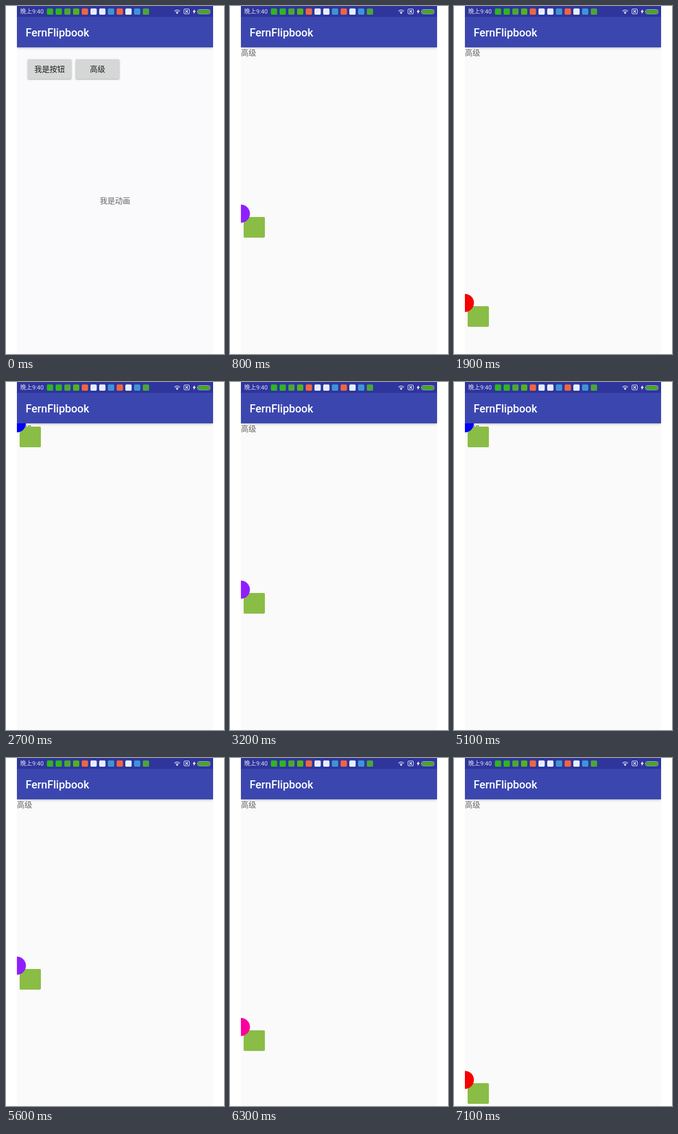
An HTML page with a canvas for the animation above (7.2 s loop, 400 by 640 pixels).

```html
<!DOCTYPE html>
<html lang="zh">
<head>
<meta charset="utf-8">
<title>FernFlipbook</title>
<style>
html, body { margin: 0; width: 100%; height: 100%; overflow: hidden; background: #fff; }
canvas { display: block; width: 400px; height: 640px; }
</style>
</head>
<body>
<canvas id="stage" width="400" height="640"></canvas>
<script>
const ctx = document.getElementById('stage').getContext('2d');
const FONT = 'Roboto, "Noto Sans CJK SC", "Noto Sans CJK", sans-serif';
const CYCLE = 2400, STEP = 100, OPEN = 300;
const DROP = { start: 315, length: 2000, top: 76, bottom: 592 };

function rect(x, y, w, h, color, r = 0) {
  ctx.fillStyle = color;
  ctx.beginPath();
  ctx.roundRect(x, y, w, h, r);
  ctx.fill();
}

function text(str, x, y, size, color, align = 'left', weight = 400) {
  ctx.font = `${weight} ${size}px ${FONT}`;
  ctx.textAlign = align;
  ctx.fillStyle = color;
  ctx.fillText(str, x, y);
}

function shadow(color, blur, dy) {
  ctx.shadowColor = color;
  ctx.shadowBlur = blur;
  ctx.shadowOffsetY = dy;
}

function line(points, width, color) {
  ctx.strokeStyle = color;
  ctx.lineWidth = width;
  ctx.beginPath();
  points.forEach(([x, y]) => ctx.lineTo(x, y));
  ctx.stroke();
}

function bounce(t) {
  t *= 1.1226;
  if (t < 0.3535) return 8 * t * t;
  if (t < 0.7408) return 8 * (t - 0.54719) ** 2 + 0.7;
  if (t < 0.9644) return 8 * (t - 0.8526) ** 2 + 0.9;
  return 8 * (t - 1.0435) ** 2 + 0.95;
}

const TINTS = [
  [0, [0, 0, 255]],
  [0.242, [143, 31, 255]],
  [0.48, [255, 0, 255]],
  [0.78, [248, 0, 0]],
  [1, [248, 0, 0]]
];

function tint(t) {
  const i = Math.max(1, TINTS.findIndex(([at]) => at >= t));
  const [a, from] = TINTS[i - 1], [b, to] = TINTS[i];
  const k = (t - a) / (b - a);
  return `rgb(${from.map((v, n) => Math.round(v + (to[n] - v) * k))})`;
}

function statusBar() {
  rect(20, 0, 360, 20, '#2e359b');
  text('晚上9:40', 26, 14, 11, '#dcdef2');
  const green = '#2fb51f', leaf = '#4ba63a', orange = '#f0653f', pale = '#e4effc', blue = '#3f94d6';
  [green, green, leaf, '#4fb31f', orange, pale, pale, blue, orange, pale, blue, leaf]
    .forEach((c, i) => rect(75 + i * 16, 4.5, 11.5, 11.5, c, 2));

  // wifi
  ctx.strokeStyle = '#e6e8f7';
  ctx.lineWidth = 1.3;
  for (const r of [3.6, 6.6]) {
    ctx.beginPath();
    ctx.arc(314, 14, r, -Math.PI * 0.77, -Math.PI * 0.23);
    ctx.stroke();
  }
  ctx.fillStyle = '#fff';
  ctx.beginPath();
  ctx.arc(314, 13, 1.4, 0, 7);
  ctx.fill();

  // no signal
  ctx.lineWidth = 1;
  ctx.beginPath();
  ctx.roundRect(326.5, 5.5, 10, 9, 1.5);
  ctx.stroke();
  line([[329, 7.5], [334, 12.5]], 1.2, '#e6e8f7');
  line([[334, 7.5], [329, 12.5]], 1.2, '#e6e8f7');

  // charging battery
  ctx.fillStyle = '#fff';
  ctx.beginPath();
  [[346.5, 5.5], [342.5, 11], [345, 11], [344, 15], [348.3, 9.3], [345.8, 9.3]]
    .forEach(([x, y]) => ctx.lineTo(x, y));
  ctx.fill();
  ctx.strokeStyle = '#b9c9c6';
  ctx.lineWidth = 1;
  ctx.beginPath();
  ctx.roundRect(351.5, 6.5, 23, 8, 3);
  ctx.stroke();
  rect(352.5, 7.5, 21, 6, '#46b010', 2);
}

function appBar() {
  ctx.save();
  ctx.beginPath();
  ctx.rect(20, 0, 360, 640);
  ctx.clip();
  shadow('rgba(0,0,0,.3)', 4, 1);
  rect(20, 20, 360, 56, '#3b47af');
  ctx.restore();
  text('FernFlipbook', 36, 56, 20, '#fff', 'left', 500);
}

function button(label, x) {
  ctx.save();
  shadow('rgba(0,0,0,.35)', 3, 1);
  rect(x, 98, 80, 36, '#d5d6d6', 2);
  ctx.restore();
  text(label, x + 40, 121, 14, '#1c1c1c', 'center');
}

function menuPage() {
  button('我是按钮', 40);
  button('高级', 128);
  text('我是动画', 200, 363, 14, '#666', 'center');
}

function dropPage(ms) {
  text('高级', 20, 91, 14, '#626262');
  let t = Math.max(0, (ms - DROP.start) / DROP.length);
  if (t > 0.99) t = 1;
  const y = DROP.top + (DROP.bottom - DROP.top) * bounce(t);
  ctx.save();
  ctx.beginPath();
  ctx.rect(20, 76, 360, 564);
  ctx.clip();
  rect(25, y + 6, 39, 38, '#8abd45', 2);
  ctx.fillStyle = tint(t);
  ctx.beginPath();
  ctx.arc(20, y, 16.6, 0, Math.PI * 2);
  ctx.fill();
  ctx.restore();
}

function draw(now) {
  const ms = Math.floor((now % CYCLE) / STEP) * STEP;
  const menu = ms < OPEN;
  rect(0, 0, 400, 640, '#fff');
  rect(20, 0, 360, 640, menu ? '#fafafc' : '#fafafa');
  appBar();
  statusBar();
  if (menu) menuPage();
  else dropPage(ms);
}

let begin;
function tick(now) {
  begin ??= now;
  draw(now - begin);
  requestAnimationFrame(tick);
}
draw(0);
requestAnimationFrame(tick);
</script>
</body>
</html>
```
